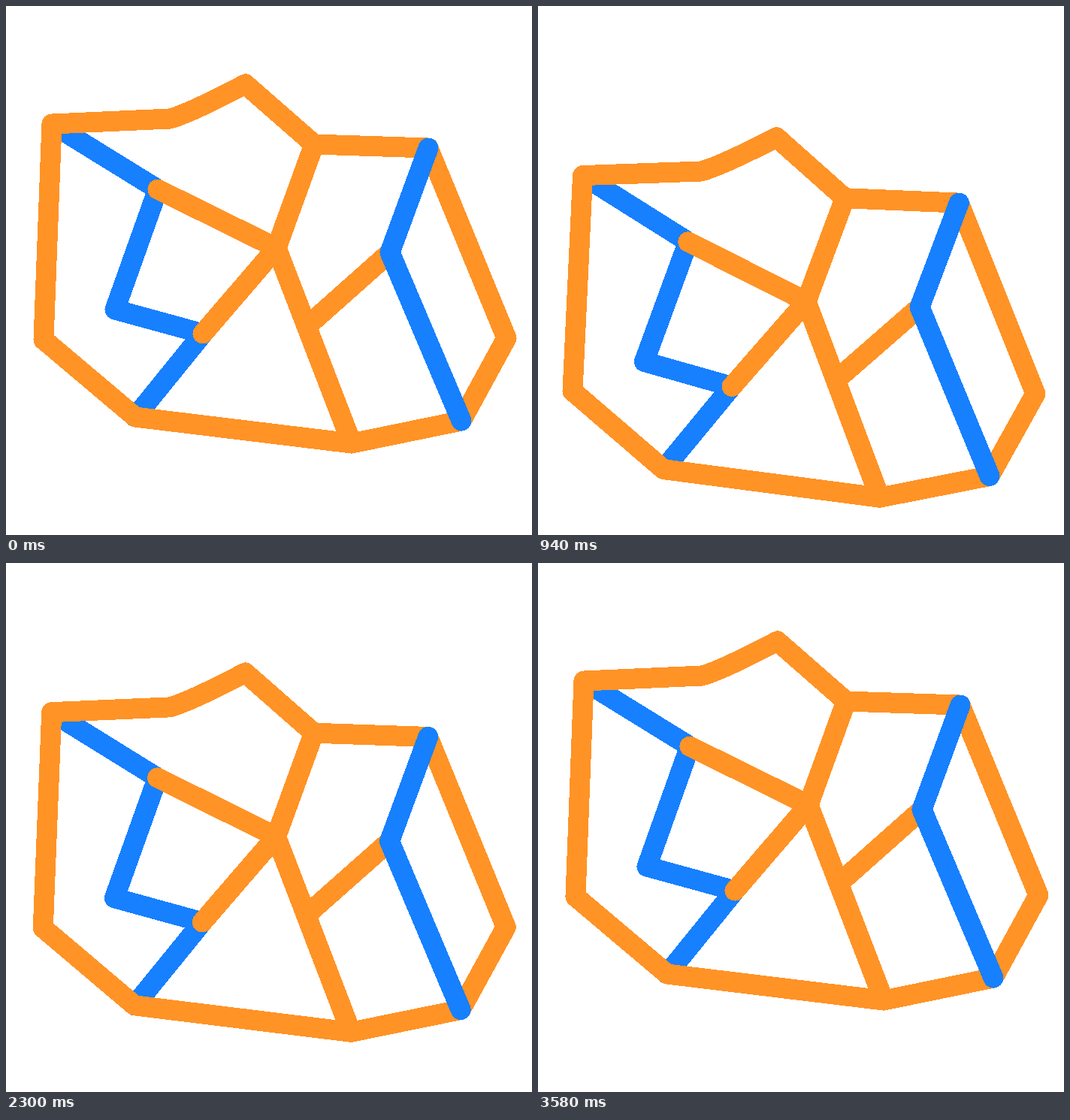
An HTML page that plays this animation: 700x704 px, repeating every 3.6 s.

```html
<!DOCTYPE html>
<html lang="en">
<head>
<meta charset="utf-8">
<title>Floating shape</title>
<style>
  html, body { margin: 0; width: 100%; height: 100%; overflow: hidden; background: #fff; }
  svg { display: block; width: 700px; height: 704px; }
  path { fill: none; stroke-width: 27; stroke-linecap: round; stroke-linejoin: round; }
  .blue { stroke: #1780ff; }
  .orange { stroke: #ff9326; }
</style>
</head>
<body>
<svg viewBox="0 0 700 704" shape-rendering="crispEdges">
  <g id="shape">
    <path class="blue" d="M61 157 L202 244 L145 404 L262 436 L172 547"/>
    <path class="orange" d="M61 157 L218 150 Q242 144 318.5 104 L410 184 L562 189 L666 442 L606 552 L460 582 L172 547 L50 444 Z
      M410 184 L360 322 L460 582 M202 244 L360 322 L262 436 M403 424 L511 328"/>
    <path class="blue" d="M562 189 L511 328 L606 552"/>
  </g>
</svg>
<script>
  const LOOP = 3600, BOB = 1800, SWAY = 1200;
  const shape = document.getElementById('shape');

  // cubic-bezier(0, 0, .58, 1)
  function easeOut(x) {
    x = Math.min(1, Math.max(0, x));
    let lo = 0, hi = 1;
    for (let i = 0; i < 20; i++) {
      const s = (lo + hi) / 2;
      if (s * s * (1.74 - 0.74 * s) < x) lo = s; else hi = s;
    }
    return lo * lo * (3 - 2 * lo);
  }

  function draw(now) {
    const t = now % LOOP;
    const y = 34.3 * (1 - Math.cos(2 * Math.PI * (t + 10) / BOB));
    const u = t % SWAY;
    const angle = 2 * (easeOut(u / 600) - easeOut((u - 618) / 582));
    shape.setAttribute('transform', `translate(0 ${y}) rotate(${angle})`);
  }

  const start = performance.now();
  function tick() {
    draw(performance.now() - start);
    requestAnimationFrame(tick);
  }
  tick();
</script>
</body>
</html>
```
